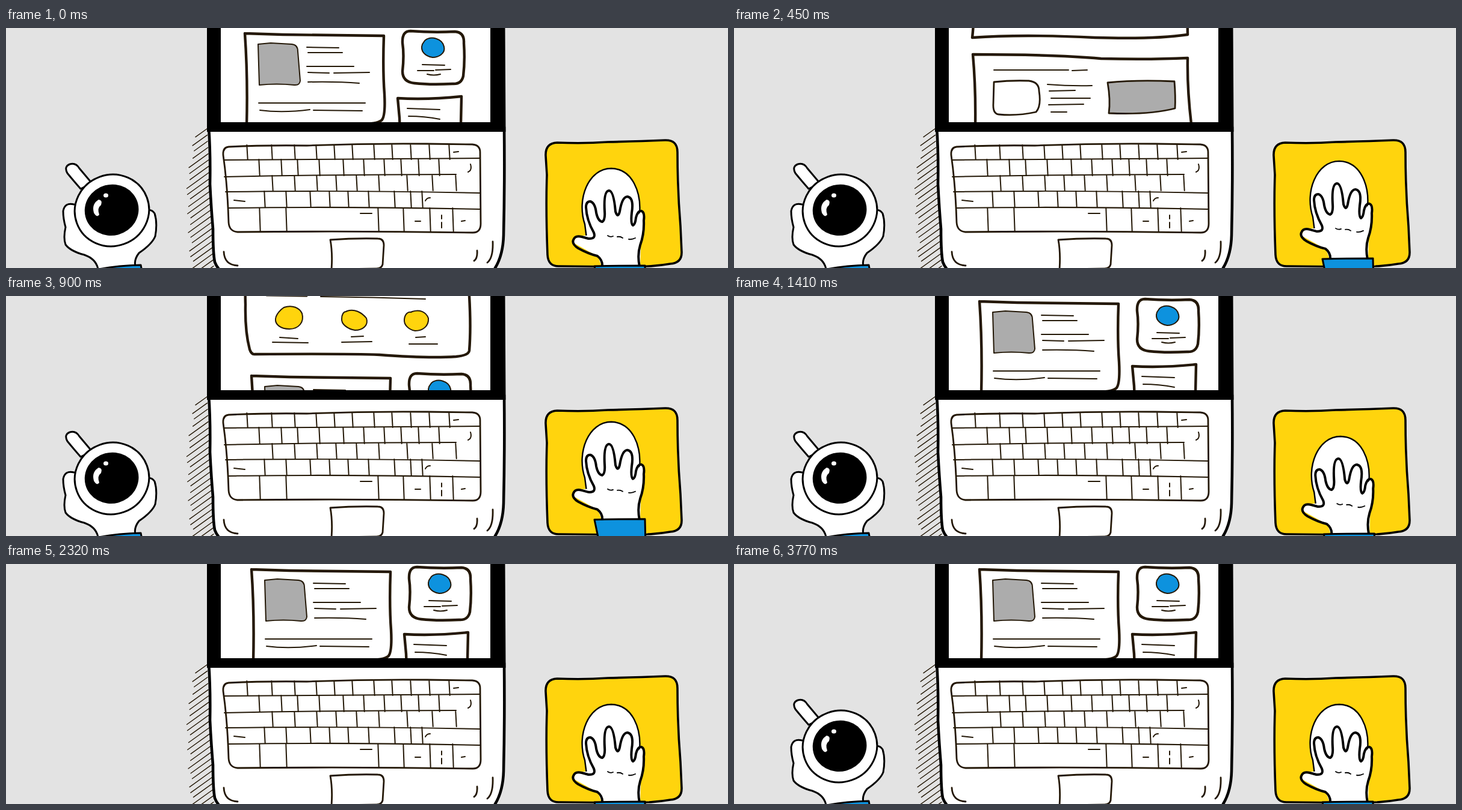
An HTML page that plays this animation: 1200x400 px, repeating every 4.77 s.

```html
<!DOCTYPE html>
<html lang="en">
<head>
<meta charset="utf-8">
<title>Desk with laptop, coffee and mouse</title>
<style>
html, body { margin: 0; width: 100%; height: 100%; overflow: hidden; background: #e3e3e3 }
svg { display: block; width: 1200px; height: 400px }
path, ellipse { fill: none; stroke: #000; stroke-linecap: round; stroke-linejoin: round }
.ink path, .ink ellipse { stroke: #241807; stroke-width: 2 }
.ink .bold { stroke-width: 4.4 }
.ink .mid { stroke-width: 2.8 }
.hand path, .hand ellipse { stroke-width: 3 }
.hand .bold { stroke-width: 4 }
.flat, .hand .flat { stroke: none }
.white { fill: #fff }
.gray { fill: #acacac }
.blue { fill: #0d92de }
.yellow { fill: #ffd40d }
.black { fill: #000 }
</style>
</head>
<body>
<svg viewBox="0 0 1200 400">
  <defs>
    <g id="page" class="ink">
      <!-- hero -->
      <path class="bold" d="M388 -215Q386 -130 387 -110Q386 -65 394 -35Q397 -26 403 -27Q560 -28 610 -26Q690 -20 737 -23Q758 -25 759 -33Q762 -70 759 -124L757 -214Q570 -219 388 -215"/>
      <path class="mid" d="M422 -125L489 -124"/>
      <path d="M512 -123Q600 -122 686 -119"/>
      <path class="yellow" d="M451 -105C465 -110 477 -104 481 -95C485 -81 476 -69 460 -69C445 -69 436 -77 437 -86C438 -94 443 -98 447 -102Z"/>
      <path class="yellow" d="M556 -99C568 -103 580 -97 588 -87C592 -75 582 -67 569 -67C557 -69 546 -77 547 -86C547 -93 550 -98 554 -98Z"/>
      <path class="yellow" d="M664 -98C676 -102 687 -98 691 -87C692 -74 682 -66 669 -66C658 -68 650 -76 651 -85C652 -94 657 -98 662 -97Z"/>
      <path d="M444 -55L474 -53M432 -47L491 -46M563 -56L583 -57M547 -47L597 -48M670 -55L686 -56M659 -44L706 -44"/>
      <!-- article and cards -->
      <path class="bold" d="M397 9L460 11L628 13Q626 70 629 110Q631 148 624 154Q616 160 590 160L400 162Q402 80 397 9"/>
      <path class="gray" d="M419 27L440 25L475 27Q485 28 485 39L489 88Q488 96 479 95Q450 92 421 95Z"/>
      <path d="M500 32L553 33M502 41L559 41M500 64L578 64M502 74L537 75M545 75L604 74M502 90Q550 89 587 92M420 125L597 125M422 137Q460 142 505 136M511 137L592 138"/>
      <path class="bold" d="M672 5Q710 8 746 6Q762 7 761 25Q763 55 760 80Q757 94 742 93Q705 95 679 92Q659 90 659 72Q662 45 659 25Q658 5 672 5Z"/>
      <path class="blue" d="M696 21C707 12 725 18 728 31C731 43 718 49 709 49C696 47 688 38 692 27Z"/>
      <path d="M692 61L729 62M684 71L711 71M714 70L739 69M700 77Q711 80 722 77"/>
      <path class="bold" d="M651 117Q700 120 757 114L756 160L757 204L656 206L654 150Z"/>
      <path d="M667 134L721 136M669 147Q695 147 721 152"/>
      <!-- wide box -->
      <path class="bold" d="M397 228Q570 235 752 229L754 321Q700 329 600 326Q480 320 396 326Q401 280 397 228Z"/>
      <path d="M425 256L560 257M425 274L715 273M428 290L690 291"/>
      <!-- footer box -->
      <path class="bold" d="M397 354Q530 354 610 361Q690 363 754 360Q753 410 760 470Q580 477 401 473Q402 410 397 354Z"/>
      <path d="M432 380L556 380M562 381L587 380M521 404Q560 407 595 406M524 415L567 414M527 427L592 427M523 438L581 437M527 450L553 450"/>
      <path class="mid" d="M432 400Q460 397 490 398Q507 400 507 415Q511 440 502 450Q470 457 440 454Q430 453 431 436Z"/>
      <path class="gray mid" d="M621 401Q670 396 732 399Q734 425 733 444Q690 455 623 452Q626 430 621 401Z"/>
    </g>
  </defs>

  <g class="ink" id="hatch"></g>
  <path class="white flat" d="M350 0H812V165H350Z"/>
  <g id="scroll">
    <use href="#page"/>
    <use href="#page" x="11" y="744"/>
  </g>
  <!-- lower half of the laptop hides the rest of the page -->
  <path class="white" style="stroke-width:4.6" d="M337 165Q340 210 339 260Q341 300 344 335Q344 375 347 390Q350 398 356 404L358 412H804Q826 388 827 345Q829 260 828 165Z"/>
  <path class="black flat" d="M334 0H357V157H805V0H829.5L830.5 173H334Z"/>
  <g class="ink" id="keys">
    <path class="mid" d="M370 198Q430 195 500 196Q600 192 700 193L775 194Q788 195 788 207L789 326Q789 341 776 341Q580 338 385 340Q371 339 370 324Q368 260 361 212Q360 199 370 198Z"/>
    <path d="M362 220Q560 219 788 217M363 248Q560 244 748 244M365 273Q560 270 788 275M369 300Q560 297 789 302"/>
    <path d="M744 207L752 206M772 227Q775 237 768 240M379 287L397 289M697 288Q699 283 705 283M589 309L608 309M680 322L689 322M724 312V318M724 324V333M757 322L763 321"/>
    <path class="mid" d="M539 353Q580 350 618 351Q628 351 628 362L626 394Q624 401 616 401L541 402Q543 375 539 353"/>
    <path class="mid" d="M362 373Q363 395 385 396M809 356Q810 383 800 391M783 371Q784 384 778 388"/>
  </g>

  <path class="yellow" style="stroke-width:3.6" d="M916 191Q960 193 1000 190Q1050 189 1095 187Q1116 186 1116 207Q1116 270 1121 330L1123 374Q1123 392 1104 393Q1070 399 1020 398L920 397Q901 398 900 378Q897 300 899 245L897 213Q896 192 916 191Z"/>

  <g class="hand" id="mouse">
    <path class="white" d="M962 327C948 285 968 234 1006 234C1042 235 1056 275 1053 310L1045 350H965Z" style="stroke-width:2.4"/>
    <path class="white flat" d="M991 400L984 381L943 358L948 347L978 345L963 293L972 289L984 316L994 318V278L1002 271L1015 313L1024 288L1034 281L1042 290L1041 325L1056 305L1061 312L1055 362L1054 400Z"/>
    <path class="bold" d="M991 398Q992 387 983 380Q967 376 951 367Q940 360 943 353Q946 345 957 348L968 351Q981 352 977 341Q965 320 964 299Q964 289 971 289Q979 291 981 308Q984 322 991 323Q996 320 995 306Q993 272 1002 271Q1010 271 1013 306Q1017 318 1020 306Q1024 281 1033 281Q1044 283 1040 308Q1038 326 1042 329Q1046 327 1047 316Q1050 304 1056 305Q1062 307 1060 321Q1061 343 1054 362Q1049 378 1053 398"/>
    <path style="stroke-width:1.8" d="M1000 346Q1004 349 1009 347M1016 348Q1021 347 1025 350M1035 352Q1040 353 1046 350"/>
    <path class="blue" d="M978 397Q1020 396 1062 396L1063 440H987Z"/>
  </g>

  <g class="hand" id="cup">
    <path class="white" d="M113 294Q98 290 95 305Q95 318 99 332Q95 350 99 361Q107 372 130 378Q150 385 153 402L216 400Q211 388 221 375Q243 360 248 347Q252 325 247 309Q242 302 236 304Z"/>
    <path class="white" d="M124 268Q110 252 102 242Q96 231 106 227Q116 224 122 234L143 259Z"/>
    <ellipse class="white" cx="176" cy="304" rx="62" ry="59.5" transform="rotate(-20 176 304)"/>
    <ellipse class="black flat" cx="175.5" cy="303.5" rx="45" ry="42.5" transform="rotate(-15 175 303)"/>
    <path class="white flat" d="M154 286Q161 287 158 295Q151 300 155 311Q151 317 146 308Q142 293 154 286Z"/>
    <ellipse class="white flat" cx="166" cy="279" rx="4" ry="3.5"/>
    <path class="blue" d="M154 402Q185 396 224 395L229 420H154Z"/>
  </g>
</svg>
<script>
const STEP = 30, LOOP = 4770;
const el = id => document.getElementById(id);
const addPath = (id, d) => el(id).insertAdjacentHTML('beforeend',
  `<svg overflow="visible"><path d="${d}"/></svg>`);

// keyboard: top, bottom and the dividers of each row
[
  [195, 219, [401, 442, 480, 516, 546, 576, 612, 642, 673, 704, 737]],
  [219, 246, [421, 458, 485, 521, 561, 595, 629, 657, 686, 720]],
  [246, 271, [443, 480, 517, 549, 583, 620, 667, 709, 748]],
  [272, 299, [430, 466, 506, 538, 569, 603, 646, 673, 692]],
  [300, 339, [422, 466, 619, 661, 705, 743]]
].forEach(([top, bottom, xs]) => addPath('keys',
  xs.map(x => `M${x - 0.7} ${top}L${x + 0.7} ${bottom}`).join('')));

// slanted shadow beside the laptop
let hatch = '';
for (let i = 0; i < 23; i++) {
  const y = 168 + i * 10.4, right = 334 + i * 0.5;
  const length = Math.min(19 + i * 2.5, 35) + 3 * Math.sin(i * 1.9);
  hatch += `M${right} ${y}L${right - length} ${y + length * 0.72}`;
}
addPath('hatch', hatch);
el('hatch').querySelector('path').style.strokeWidth = 1.4;

// piecewise linear value through [x, y] points
function ramp(x, ...points) {
  let [x0, y0] = points[0];
  if (x <= x0) return y0;
  for (const [x1, y1] of points) {
    if (x < x1) return y0 + (y1 - y0) * (x - x0) / (x1 - x0);
    [x0, y0] = [x1, y1];
  }
  return y0;
}
const move = (id, x, y) => el(id).setAttribute('transform', `translate(${x} ${y})`);
const steps = (t, start) => Math.floor((t - start) / STEP) + 1;

function draw(now) {
  const t = now % LOOP;
  const scroll = steps(t, STEP), shake = steps(t, 1410);
  move('scroll', 0, ramp(scroll, [0, 0], [36, -744]));
  move('mouse',
    ramp(shake, [0, 0], [4, 9], [9, -16], [13, 0]),
    ramp(scroll, [0, 0], [31, -25], [36, 0]));
  const drop = ramp(steps(t, 2200), [0, 0], [5, 192]);
  const rise = ramp(steps(t, 3650), [0, 0], [5, 192]);
  move('cup', 0, drop - rise);
  requestAnimationFrame(draw);
}
requestAnimationFrame(draw);
</script>
</body>
</html>
```
